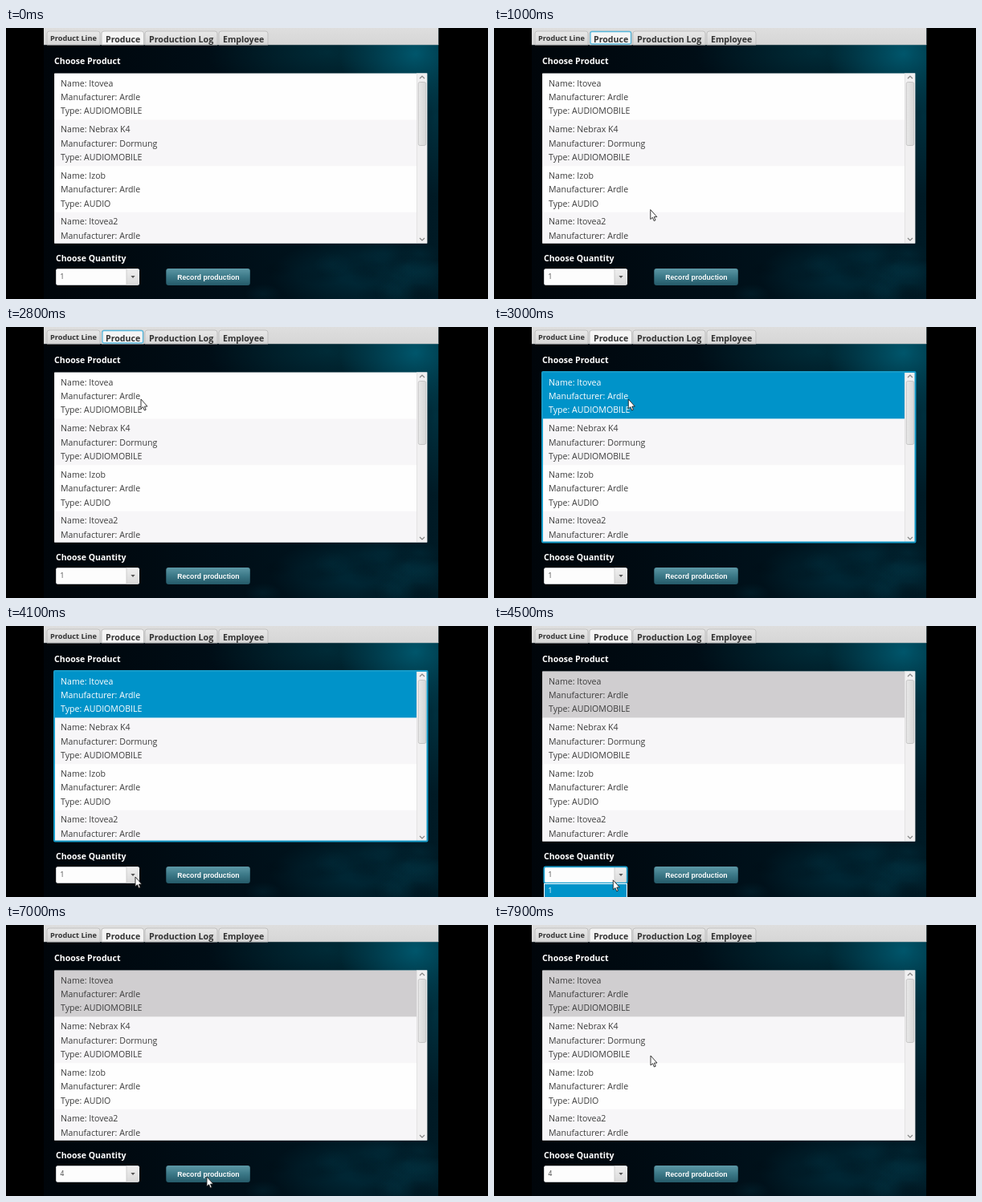
Animation, 600 px wide and 338 px high, one loop 8000 ms. Source, as an HTML page with a canvas:

```html
<!DOCTYPE html>
<html lang="en">
<head>
<meta charset="utf-8">
<title>Produce</title>
<style>
html, body { margin: 0; width: 100%; height: 100%; overflow: hidden; background: #000; }
canvas { display: block; width: 600px; height: 338px; }
</style>
</head>
<body>
<canvas id="stage" width="600" height="338"></canvas>
<script>
const ctx = document.getElementById('stage').getContext('2d');
const LOOP = 8000, STEP = 100;
const UI = '"Open Sans", "Noto Sans", sans-serif';
const ARIAL = '"Liberation Sans", Arial, sans-serif';
const ACCENT = '#0093c9';
const LEFT = 47, WIDTH = 491.3;

const products = [
  ['Itovea', 'Ardle', 'AUDIOMOBILE'],
  ['Nebrax K4', 'Dormung', 'AUDIOMOBILE'],
  ['Izob', 'Ardle', 'AUDIO'],
  ['Itovea2', 'Ardle', 'AUDIOMOBILE']
];

// label, left, right, text x, font size, baseline
const tabs = [
  ['Product Line', 51, 117, 55, 9.2, 16],
  ['Produce', 119, 171.5, 124, 10.6, 17.5],
  ['Production Log', 173, 263, 178, 10.7, 17.5],
  ['Employee', 265, 326, 270, 10.6, 17.5]
];

// time, x, y of the pointer tip
const path = [
  [100, 146, 9], [500, 215, 110], [900, 190, 225], [1400, 236, 240],
  [1900, 220, 156], [2300, 226, 138], [2800, 168, 90], [3300, 166, 90],
  [3600, 176, 165], [4100, 161, 313], [4400, 161, 313], [4700, 112, 328],
  [5100, 100, 345], [6200, 140, 345], [6600, 222, 300], [7000, 250, 314],
  [7200, 246, 308], [7500, 100, 225], [7900, 195, 163]
];

const EVENTS = { tabFocus: 300, select: 2900, open: 4400, pick: 5200, record: 6900 };

function box(x, y, w, h, fill) {
  ctx.fillStyle = fill;
  ctx.fillRect(x, y, w, h);
}

function round(x, y, w, h, r, fill, stroke, line = 1) {
  ctx.beginPath();
  ctx.roundRect(x, y, w, h, r);
  if (fill) { ctx.fillStyle = fill; ctx.fill(); }
  if (stroke) { ctx.strokeStyle = stroke; ctx.lineWidth = line; ctx.stroke(); }
}

function vertical(y0, y1, ...colors) {
  const g = ctx.createLinearGradient(0, y0, 0, y1);
  colors.forEach((c, i) => g.addColorStop(i / (colors.length - 1), c));
  return g;
}

function text(s, x, y, size, color, weight = 400, family = UI) {
  ctx.font = `${weight} ${size}px ${family}`;
  ctx.fillStyle = color;
  ctx.fillText(s, x, y);
}

function poly(points, fill, stroke) {
  ctx.beginPath();
  points.forEach(([x, y]) => ctx.lineTo(x, y));
  ctx.closePath();
  if (fill) { ctx.fillStyle = fill; ctx.fill(); }
  if (stroke) { ctx.strokeStyle = stroke; ctx.lineWidth = 0.9; ctx.stroke(); }
}

function glow(x, y, rx, ry, rgb, alpha) {
  ctx.save();
  ctx.translate(x, y);
  ctx.scale(rx, ry);
  const g = ctx.createRadialGradient(0, 0, 0, 0, 0, 1);
  g.addColorStop(0, `rgba(${rgb},${alpha})`);
  g.addColorStop(1, `rgba(${rgb},0)`);
  ctx.fillStyle = g;
  ctx.fillRect(-1, -1, 2, 2);
  ctx.restore();
}

function backdrop() {
  box(0, 0, 600, 338, '#000');
  ctx.save();
  ctx.beginPath();
  ctx.rect(LEFT, 0, WIDTH, 338);
  ctx.clip();
  const g = ctx.createLinearGradient(LEFT, 0, LEFT + WIDTH, 0);
  g.addColorStop(0, '#00050a');
  g.addColorStop(0.45, '#000e17');
  g.addColorStop(1, '#001a25');
  box(LEFT, 0, WIDTH, 338, g);
  glow(400, 30, 150, 60, '0,62,76', 0.55);
  glow(510, 32, 95, 75, '0,100,124', 0.8);
  glow(535, 110, 35, 100, '0,70,88', 0.5);
  glow(440, 308, 110, 48, '0,58,76', 0.6);
  let seed = 7;
  const rand = () => (seed = seed * 16807 % 2147483647) / 2147483647;
  for (let i = 0; i < 22; i++) {
    const x = 320 + rand() * 215, y = 278 + rand() * 58;
    glow(x, y, 16 + rand() * 24, 9 + rand() * 14, i % 2 ? '0,10,18' : '4,68,86', 0.2);
  }
  ctx.restore();
}

function drawTabs(focused) {
  box(LEFT, 0, WIDTH, 21, vertical(0, 21, '#dedede', '#d6d6d6'));
  box(LEFT, 20.4, WIDTH, 0.8, '#bfc2c3');
  tabs.forEach(([label, left, right, x, size, base], i) => {
    const active = i === 1;
    const fill = active ? '#f5f5f5' : vertical(4, 21, '#e8e8e8', '#d6d6d6');
    round(left, 4, right - left, 17, [3, 3, 0, 0], fill, '#bdbdbd', 0.9);
    if (active && focused) round(left + 1, 4.5, right - left - 2, 15.5, 2, null, '#58b8dd', 1.3);
    text(label, x, base, size, '#333', 700);
  });
}

function drawList(selected, focused) {
  ctx.save();
  ctx.beginPath();
  ctx.rect(60.3, 56.4, 464, 212);
  ctx.clip();
  box(60, 56, 465, 213, '#fefefe');
  products.forEach(([name, maker, type], i) => {
    const y = 57 + i * 57.6;
    const on = i === 0 && selected;
    box(60, y, 451, 57.6, on ? (focused ? ACCENT : '#d0ced0') : i % 2 ? '#f7f6f8' : '#fefefe');
    const color = on && focused ? '#fff' : '#3c3c3c';
    [`Name: ${name}`, `Manufacturer: ${maker}`, `Type: ${type}`].forEach((s, k) =>
      text(s, 68, y + 15.6 + k * 17.35, 10.6, color));
  });
  drawScroll();
  ctx.restore();
  if (focused) round(60, 56, 464.5, 212.5, 1, null, '#159bc9', 2);
}

function drawScroll() {
  box(511.3, 56, 13.2, 213, '#f1f0f1');
  box(511, 56, 0.7, 213, '#dcdcdc');
  const g = ctx.createLinearGradient(513, 0, 523, 0);
  g.addColorStop(0, '#e9e9e9');
  g.addColorStop(1, '#d6d6d6');
  round(513.3, 67.5, 9.4, 79, 2, g, '#c2c2c2', 0.9);
  ctx.strokeStyle = '#858585';
  ctx.lineWidth = 1.2;
  [[63, 60], [262, 265]].forEach(([a, b]) => {
    ctx.beginPath();
    ctx.moveTo(515, a);
    ctx.lineTo(518, b);
    ctx.lineTo(521, a);
    ctx.stroke();
  });
}

function drawCombo(value, focused, caret) {
  round(62.2, 300.2, 103.8, 20.6, 2, '#fdfdfd');
  round(150, 300.5, 15.7, 20, [0, 2, 2, 0], vertical(300, 321, '#f0f0f0', '#d8d8d8'));
  box(149.6, 300.5, 0.8, 20, '#c6c6c6');
  poly([[155.4, 309], [160.6, 309], [158, 312]], '#555');
  if (focused) round(62.3, 300.3, 103.4, 20.4, 2, null, '#1ba0cf', 1.8);
  text(value, 67.5, 313.3, 8.4, '#444');
  if (caret) box(67, 304.5, 1, 12, '#222');
}

function drawPopup() {
  box(62, 321, 104, 17, '#fefefe');
  box(63, 322, 102, 16, ACCENT);
  text('1', 67.5, 333, 8.4, '#fff');
}

function drawButton() {
  round(199.3, 300, 104.5, 21, 3, vertical(300, 321, '#5d98a6', '#3b7887', '#255a69'));
  text('Record production', 213.3, 313.7, 8.65, '#fff', 700, ARIAL);
}

function pointerAt(t) {
  const i = path.findIndex(p => p[0] >= t);
  if (i <= 0) return path[0].slice(1);
  const [t0, x0, y0] = path[i - 1], [t1, x1, y1] = path[i];
  const u = (t - t0) / (t1 - t0), k = u * u * (3 - 2 * u);
  return [x0 + (x1 - x0) * k, y0 + (y1 - y0) * k];
}

function drawPointer(t) {
  if (t < path[0][0]) return;
  const [x, y] = pointerAt(t);
  ctx.save();
  ctx.translate(x, y);
  poly([[0, 0], [0, 12], [2.6, 9.7], [4.4, 14], [6.2, 13.2], [4.5, 9.1], [8, 9]], '#fff', '#222');
  ctx.restore();
}

function draw(t) {
  const e = EVENTS;
  const editing = t >= e.open && t < e.record;
  backdrop();
  drawTabs(t >= e.tabFocus && t < e.select);
  text('Choose Product', 60, 45.2, 10.6, '#fff', 700);
  drawList(t >= e.select, t >= e.select && t < e.open);
  text('Choose Quantity', 62, 291, 10.5, '#fff', 700);
  const caret = editing && t >= e.pick && Math.floor((t - e.pick) / 500) % 2 === 0;
  drawCombo(t >= e.pick ? '4' : '1', editing, caret);
  drawButton();
  if (t >= e.open && t < e.pick) drawPopup();
  drawPointer(t);
}

function frame() {
  draw(Math.floor(performance.now() % LOOP / STEP) * STEP);
  requestAnimationFrame(frame);
}
frame();
</script>
</body>
</html>
```
